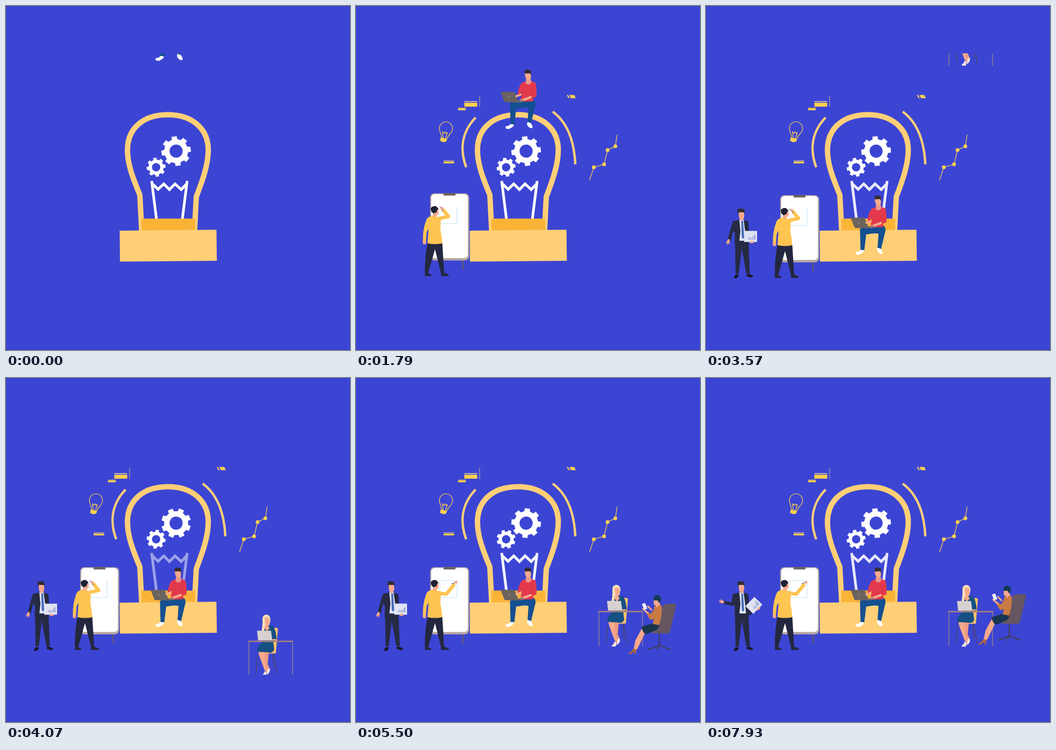
An HTML page that plays this animation: 640x640 px, repeating every 8000 ms.

```html
<!DOCTYPE html>
<html lang="en">
<head>
<meta charset="utf-8">
<title>Idea at work</title>
<style>
  html, body { margin: 0; width: 100%; height: 100%; overflow: hidden; background: #3c45d3; }
  svg { display: block; width: 100%; height: 100%; }
  .limb { fill: none; stroke-linejoin: round; stroke-linecap: round; }
  .line { fill: none; }
  .skin { fill: #f6a98c; }
  .skinLine { fill: none; stroke: #f6a98c; stroke-linecap: round; }
  .navy { fill: #23273f; }
  .gold { fill: #ffd04e; }
</style>
</head>
<body>
<svg viewBox="0 0 640 640">
  <clipPath id="window"><rect y="88" width="640" height="464"/></clipPath>
  <g clip-path="url(#window)">
    <g class="line" stroke="#ffcf77" stroke-width="4.4">
      <path class="arc" pathLength="100" d="M222.500 207.500C198 233 192 265 205 300"/>
      <path class="arc" pathLength="100" d="M366 196.500C394 217 406 252 408 294.500"/>
    </g>

    <g id="icons">
      <g class="line" stroke="#ffd04e" stroke-width="1.2">
        <path d="M434.500 324L442.500 300L461.500 294.500L468 268L482.500 261L485.800 239.500"/>
        <path d="M159 245C160 239 155.500 236 155.300 229A12.200 12.200 0 1 1 179.500 229.500C179 237 171 239 169.500 247M162 245L161 234L164 237L166 234L168 237L170 235L166.500 246"/>
      </g>
      <g class="gold">
        <circle cx="442.500" cy="300" r="3.500"/><circle cx="461.500" cy="294.500" r="3.500"/>
        <circle cx="468" cy="268" r="3.500"/><circle cx="482.500" cy="261" r="3.500"/>
        <path d="M157.500 244.500L169.500 247L168 252L163 253.500L156.500 251Z"/>
        <path d="M392 165.500h2.500l3.500 6h-2.500ZM397 165.500h9l3 6h-9Z"/>
        <rect x="201.500" y="180" width="24" height="7.300"/>
        <rect x="201.500" y="177" width="24" height="1.500" fill="#f1d9a0"/>
        <rect x="190" y="191" width="14.200" height="3"/>
        <rect x="190" y="189" width="14.200" height="2.200" fill="#bda46c"/>
        <rect x="163" y="289.300" width="19.500" height="3.500"/>
        <rect x="163" y="287" width="19.500" height="1.300" fill="#c1b2ad"/>
        <rect x="229.300" y="167.500" width="1.300" height="20.500" fill="#a79a94"/>
      </g>
    </g>

    <path class="line" stroke="#ffcf77" stroke-width="10" d="M252.500 418L249 351.500C237 322 226 296 226 268C226 226 257 202.300 301 202.300C345 202.300 376.300 227 376.300 268C376.300 296 365 326 354 355L350.800 418"/>
    <g id="filament" class="line" stroke="#fff" stroke-width="5">
      <path d="M271 325.500L280 397M337 325.500L328 397M271.500 330L283 341L293.500 331L304 341.500L314.500 331L326 341.500L337 330"/>
    </g>
    <path fill="#f9b438" d="M252 395.500H352V418H252Z"/>
    <path fill="#ffcf77" d="M211.500 418L391.500 416.200L392.300 474L212 475.500Z"/>
    <path id="bigGear" fill="#fff" fill-rule="evenodd"/>
    <path id="smallGear" fill="#fff" fill-rule="evenodd"/>

    <!-- whiteboard and presenter -->
    <g id="board">
      <rect x="197.700" y="475" width="3" height="18.500" fill="#59567a"/>
      <rect x="138" y="352" width="72.500" height="125" rx="8" fill="#b4a6a3"/>
      <rect x="140" y="353.500" width="68.200" height="119" rx="6.500" fill="#fff"/>
      <rect x="163" y="351.500" width="22" height="4.700" fill="#6b6160"/>
      <path class="line" stroke="#c9e4f6" stroke-width="1.200" d="M188 377V408.500H156V390"/>
      <path id="sketch" class="line" stroke="#c9e4f6" stroke-width="1.200"/>
      <path class="navy" d="M133 444H160.500L164 500H158L147 456L134.500 500H128Q128 468 133 444Z"/>
      <path class="navy" d="M128.500 500H134L140.500 504Q141 506 138 506H128ZM158 499.500H164L173 503.500Q173 506 170 506H158Z"/>
      <ellipse class="skin" cx="127.300" cy="443" rx="3.200" ry="4"/>
      <path fill="#ffc551" d="M136 396Q140 393 147 394.500L158 397L157 420Q160 434 160.500 445Q147 448 133 445L135 418L131.500 424L130 441H124.500Q124 420 130 404Q132 397 136 396Z"/>
      <path class="skin" d="M144 388L150 378L153.500 381L154 390L151 392.500L149 395.500Q145 397 142.500 394Z"/>
      <path fill="#1e2235" d="M139 380Q142 375 149 376L153.500 380.500L151 383L150 387L144 389.500Q139 386 139 380Z"/>
      <polyline id="sleeve" class="limb" stroke="#ffc551" stroke-width="6.500"/>
      <path id="pen" class="line" stroke="#59567a" stroke-width="1.200"/>
      <circle id="penHand" class="skin" r="2.600"/>
    </g>

    <!-- seated man with laptop -->
    <g id="coder">
      <path fill="#134f91" d="M287 415L308 409L331 409Q336 415 333 422L325.500 453L319 452L321 424Q314 422 300 425Q287 425 287 415Z"/>
      <path fill="#fff" d="M319.500 450L325 452Q329 457 328.500 460.500Q325 463.500 321 459Q316 454 319.500 450Z"/>
      <g id="shin">
        <path fill="#134f91" d="M286.500 415Q292 410 299 417L294.500 454.500H287.500Z"/>
        <path fill="#fff" d="M287.500 454L293.500 454.500Q294 458 290 460L285 463Q278 463.500 278 459.500Q279 457.500 284 457Z"/>
      </g>
      <path fill="#e4394c" d="M310 376.500L316 374.500L327 374L334 377Q337 390 335.500 403L329.500 405L330 411.500L306 412.500L309 391L305 403L300.500 399Q304 379 310 376.500Z"/>
      <path class="line" stroke="#c92d45" stroke-width=".8" d="M329 384L327.500 401"/>
      <path fill="#e8988a" d="M316 370H325L326.500 376Q322 384 315.500 378Z"/>
      <path class="skin" d="M314 359H325.500V368Q323 373 318.500 371Q314 368 314 359Z"/>
      <path fill="#302d38" d="M313 355Q319 350.500 325.500 354.500L326 364L324 359.500L314.500 360Z"/>
      <path class="skinLine" stroke-width="4.500" d="M325 404L306 411"/>
      <path fill="#69625e" d="M269 394L295 394L302 411L312 408.500L312 410.500L302 414L276.500 413Z"/>
      <circle cx="284" cy="403.500" r="2" fill="#827a75"/>
      <path id="typing" class="skinLine" stroke-width="4" d="M306 400L298.500 402.500"/>
    </g>

    <!-- businessman -->
    <g id="boss">
      <path fill="#262a42" d="M54 436H79L81.500 499H75L66.500 452L61 499.500H55Z"/>
      <path fill="#171a2b" d="M55 501H61Q61 506 56 508Q51 508 52 505ZM75.500 500H81L88 503.500Q87 506.500 82 506L76 504Z"/>
      <path fill="#e4e8f7" d="M61 399H72L76 438H62Z"/>
      <path fill="#456ab7" d="M65.500 401H69L71 432L68.500 435L66.500 431Z"/>
      <path fill="#262a42" d="M62 399L53 401Q48 404 49.500 416L54 425L53 444L61.500 445L64 420ZM70 399L76.500 401Q80 406 79.500 420L79 442L75 445L73 422Z"/>
      <path class="skin" d="M60.500 384H71V394Q70 399 66 401Q62 399 61.500 394Z"/>
      <path fill="#302d38" d="M58 380Q64 376 71.500 380L72 388L70 385H61L60 390Z"/>
      <path class="limb" stroke="#262a42" stroke-width="6" d="M76 405L77.500 432L82 438"/>
      <g id="paper">
        <rect x="-12" y="-10.300" width="24" height="20.600" fill="#dfe3f3"/>
        <path class="line" stroke="#98a5d5" stroke-width="1.500" d="M-3.500 6V2M-1 6V1M1.500 6V3M4 6V0M6.500 6V-2M8.200 6V-4"/>
        <ellipse class="skin" cx="2" cy="10.500" rx="4" ry="2"/>
      </g>
      <polyline id="bossSleeve" class="limb" stroke="#262a42" stroke-width="5.800"/>
      <g id="bossHand" class="skinLine" stroke-width="1.500">
        <path d="M0 0L-7 -3M0 0L-9 0M0 0L-7 3"/>
        <ellipse class="skin" cx="-3" rx="4" ry="2.200" stroke="none"/>
      </g>
    </g>

    <!-- woman at the desk -->
    <g id="clerk">
      <path class="line" stroke="#4a4662" stroke-width="1.300" d="M468 460L466 493M498 458L505 495M496 458L499 486"/>
      <path fill="#ffc26a" d="M497 410Q504 408 506 411L502 457L470 458V455L496 453Z"/>
      <path class="skin" d="M469 451Q475 450 482 456L488 488L486 494L481 488L471 461Z"/>
      <path fill="#eb9a84" d="M481 452L489 454L487 477L491 486L489 493L486 491L482 477Z"/>
      <path fill="#f5e6de" d="M481 490L485 493L483.500 499.500L476 500Q475 498 480 494ZM487 485L491 486Q492 491 488 495L485 497Z"/>
      <path fill="#145083" d="M478 408Q485 404 494 406Q501 406 503.500 429Q503 434 497 434L499 450Q496 458 486 455L467 454Q467 443 477 437Z"/>
      <path fill="#fae0b6" d="M477 392Q478 385 485 385Q492 386 492 395L490 404L482 406L480 416L474 419Q478 409 477 392Z"/>
      <path class="skin" d="M481 393Q486 388 490.500 394L490 402L488 407L491 410L485 416L480 409L483 405Z"/>
      <path class="line" stroke="#ccb393" stroke-width=".9" d="M480 393Q486 387 491 393"/>
      <path fill="#d6d1d0" d="M467 415H493L495.500 433H469Z"/>
      <path id="clerkHand" class="skinLine" stroke-width="2.500" d="M496 432L501 431.500"/>
      <path class="line" stroke="#ac8378" stroke-width="2.600" d="M450.800 434.700H534"/>
      <path class="line" stroke="#95808c" stroke-width="1.400" d="M452 436V499.500M533 436V499.500"/>
    </g>

    <!-- woman on the office chair -->
    <g id="reader">
      <path class="limb" stroke="#433e4c" stroke-width="2" d="M564.500 457V480M564.500 480L544 487.500M564.500 480L585 487.500M564.500 480L560 488"/>
      <path fill="#655661" d="M571 406Q572 403 577 402.500L593 402Q596 403 595 407L584 455Q583 457 579 457.500L553 457Q547 456 548 451L560 444Z"/>
      <path class="skin" d="M532 448L540 452L525 483L521 490L516 489L520 470Z"/>
      <path fill="#a9653f" d="M516 486L522 487L520 496H518L517.500 491L511 496H507Q507 493 512 491Z"/>
      <path fill="#18354f" d="M531 445L551 439L565 440Q563 451 554 453L540 459Q534 458 531 445Z"/>
      <path fill="#c97b43" d="M555 407Q562 402 569 406Q570 423 564 442L552 440L554 430L548 432L543 426L553 416Z"/>
      <path class="skin" d="M554 396L563 394L566 404L559 409L557 405L554 404Z"/>
      <path fill="#153b53" d="M553 392Q555 386 561 386Q568 388 567.500 395L564 401L561 396L554 396Z"/>
      <path class="limb" stroke="#c97b43" stroke-width="5.500" d="M565 411L550 428L543 420"/>
      <path class="skinLine" stroke-width="3" d="M542 419L534 412M550 414L543 407"/>
      <path fill="#f0eff5" d="M532 402.500L538 401L542 411.500L536 413.500Z"/>
    </g>
  </g>
</svg>
<script>
const $ = id => document.getElementById(id);
const LOOP = 8000;
const GEAR_TURN = 7000;

const clamp = x => Math.min(1, Math.max(0, x));
const smooth = x => { x = clamp(x); return x * x * (3 - 2 * x); };
const span = (t, from, to) => smooth((t - from) / (to - from));

// Eased values between stops of the form [time, ...values].
function track(t, stops) {
  let i = 0;
  while (i < stops.length - 2 && t > stops[i + 1][0]) i++;
  const [a, b] = [stops[i], stops[i + 1]];
  const k = span(t, a[0], b[0]);
  return a.slice(1).map((v, n) => v + (b[n + 1] - v) * k);
}

// Straight fall, then a damped spring around the resting place.
function drop(t, land, height) {
  const s = (t - land) / 1000;
  return s < 0 ? Math.max(-height, s * 1080) : 93 * Math.sin(11.6 * s) * Math.exp(-3.7 * s);
}

function gearPath(outer, root, hole) {
  const pts = [];
  for (let i = 0; i < 8; i++) {
    for (const [r, deg] of [[root, -13], [outer, -10], [outer, 10], [root, 13]]) {
      const a = (i * 45 + deg - 98) * Math.PI / 180;
      pts.push((r * Math.cos(a)).toFixed(2) + ' ' + (r * Math.sin(a)).toFixed(2));
    }
  }
  return `M${pts.join('L')}ZM${hole} 0A${hole} ${hole} 0 1 0 ${-hole} 0A${hole} ${hole} 0 1 0 ${hole} 0Z`;
}
$('bigGear').setAttribute('d', gearPath(27.8, 22.5, 12.2));
$('smallGear').setAttribute('d', gearPath(17.8, 14.2, 7.8));

const fallers = [
  ['board', 1272, 430], ['coder', 2008, 361], ['boss', 2732, 430],
  ['clerk', 3931, 430], ['reader', 5270, 430]
];
const glow = [[0, 1], [900, .4], [1800, 1], [2700, .4], [3500, .9], [4300, .4], [5300, 1], [6350, .44], [8000, .88]];
const penArm = [[4000, 172, 395, 160, 380], [4700, 178, 400, 180, 381], [5300, 168, 402, 186, 380]];
const bossArm = [[6000, 46.5, 424, 43.5, 436, -72], [6450, 50, 421, 34, 417.5, 22]];
const kick = [[5800, 0], [6450, 17], [7200, 0]];
const arcs = document.querySelectorAll('.arc');

const move = (id, value) => $(id).setAttribute('transform', value);

function draw(t) {
  for (const [id, land, height] of fallers) move(id, `translate(0 ${drop(t, land, height)})`);

  const grow = span(t, 430, 1335);
  move('icons', `translate(300 285) rotate(${360 * (grow - 1)}) scale(${grow}) translate(-300 -285)`);
  for (const arc of arcs) {
    arc.style.visibility = grow ? 'visible' : 'hidden';
    arc.setAttribute('stroke-dasharray', grow < 1 ? `${50 * grow} ${100 - 100 * grow} ${50 * grow} 100` : 'none');
  }

  $('filament').setAttribute('opacity', track(t, glow)[0]);
  const turned = 360 * t / GEAR_TURN;
  move('bigGear', `translate(316.500 270) rotate(${turned})`);
  move('smallGear', `translate(279.300 300) rotate(${-turned})`);

  const [ex, ey, hx, hy] = track(t, penArm);
  $('sleeve').setAttribute('points', `150,400 ${ex},${ey} ${hx + (ex - hx) * .25},${hy + (ey - hy) * .25}`);
  $('penHand').setAttribute('cx', hx);
  $('penHand').setAttribute('cy', hy);
  const lean = span(t, 4000, 5300);
  $('pen').setAttribute('d', `M${hx + 2} ${hy + 5 - 6 * lean}L${hx - 4 - 4 * lean} ${hy - 3 + 6 * lean}`);
  const drawn = span(t, 3900, 5000);
  $('sketch').setAttribute('d', drawn ? `M156 390V377H${156 + 32 * drawn}` : '');

  const [bx, by, wx, wy, turn] = track(t, bossArm);
  $('bossSleeve').setAttribute('points', `52.5,404 ${bx},${by} ${wx},${wy}`);
  move('bossHand', `translate(${wx - 1} ${wy}) rotate(${turn})`);
  const lift = span(t, 6000, 6450);
  move('paper', `translate(${83 + 6 * lift} ${430 - 7 * lift}) rotate(${-46 * lift})`);

  move('shin', `rotate(${track(t, kick)[0]} 296 415)`);
  move('typing', `translate(0 ${Math.sin(t / 110)})`);
  move('clerkHand', `translate(${Math.sin(t / 130) * .8} 0)`);
}

const start = performance.now();
function frame() {
  draw((performance.now() - start) % LOOP);
  requestAnimationFrame(frame);
}
frame();
</script>
</body>
</html>
```
